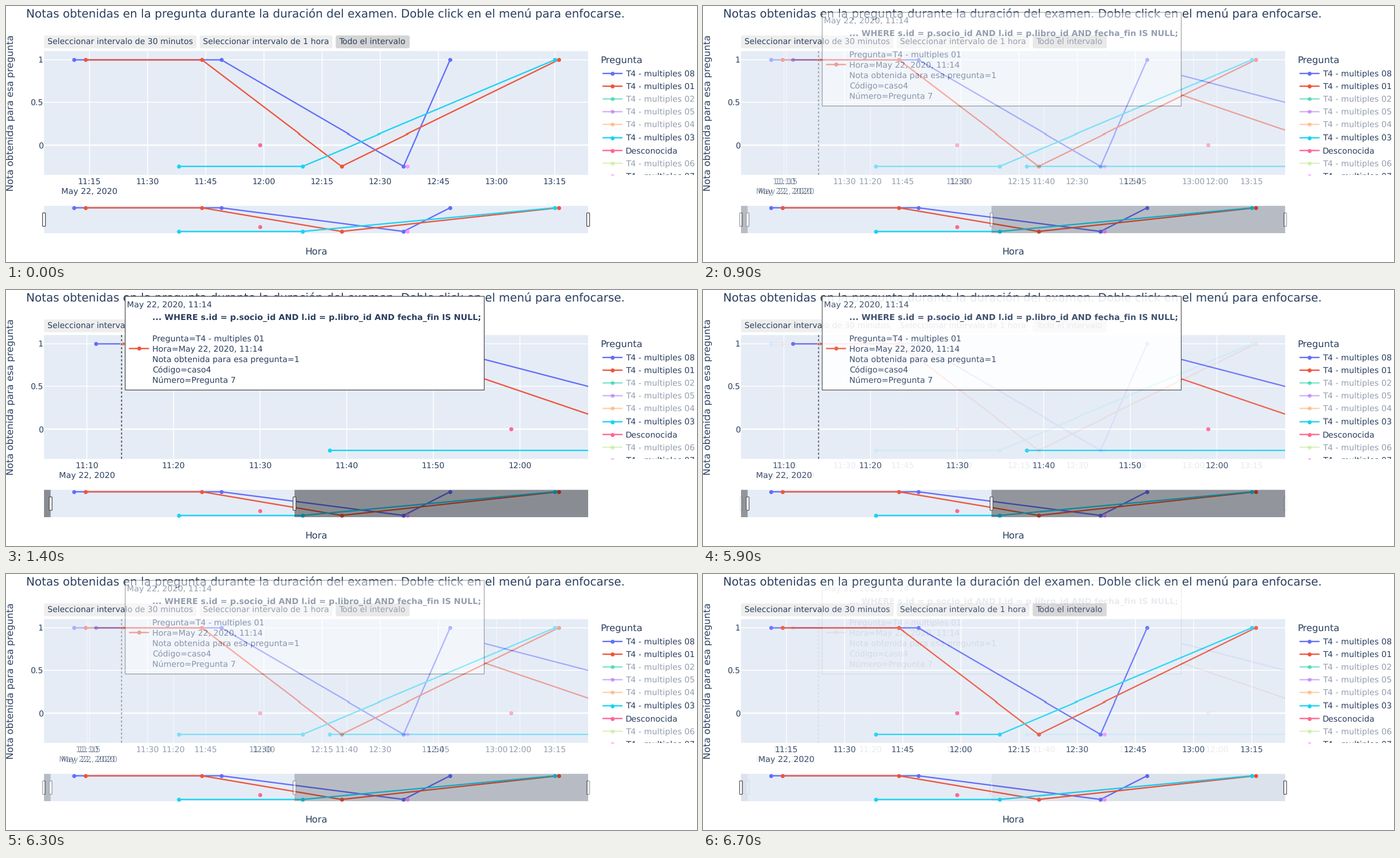
A matplotlib script for the animation above (6.8 s loop, 1200 by 444 pixels).

```python
import numpy as np
import matplotlib.pyplot as plt
from matplotlib.animation import FuncAnimation
from matplotlib.patches import FancyBboxPatch, Rectangle

W, H, DPI = 1200, 444, 100
PX = 72 / DPI  # points per pixel
FRAMES, INTERVAL = 68, 100

plt.rcParams["font.family"] = "DejaVu Sans"
plt.rcParams["text.hinting"] = "none"

INK, BG, EDGE = "#2a3f5f", "#e5ecf6", "#444444"
BLUE, RED, CYAN = "#636efa", "#ef553b", "#19d3f3"
PINK, MAGENTA = "#ff6692", "#ff97ff"

LEFT, RIGHT, TOP, BOTTOM = 66, 1011, 79.2, 293
SLIDE_TOP, SLIDE_BOTTOM = 346.6, 394

# colour, then (minute of day, mark) points
SERIES = [
    (BLUE, [(671, 1), (709, 1), (756, -0.25), (768, 1)]),
    (RED, [(674, 1), (704, 1), (740, -0.25), (796, 1)]),
    (CYAN, [(698, -0.25), (730, -0.25), (795, 1)]),
    (PINK, [(719, 0)]),
    (MAGENTA, [(757, -0.25)]),
]

# label, colour, opacity
LEGEND = [
    ("T4 - multiples 08", BLUE, 1),
    ("T4 - multiples 01", RED, 1),
    ("T4 - multiples 02", "#00cc96", 0.5),
    ("T4 - multiples 05", "#ab63fa", 0.5),
    ("T4 - multiples 04", "#ffa15a", 0.5),
    ("T4 - multiples 03", CYAN, 1),
    ("Desconocida", PINK, 1),
    ("T4 - multiples 06", "#b6e880", 0.5),
    ("T4 - multiples 07", MAGENTA, 1),
]

BUTTONS = [
    (66, 331, "Seleccionar intervalo de 30 minutos", "#eeeeee"),
    (336.5, 567, "Seleccionar intervalo de 1 hora", "#eeeeee"),
    (572.5, 701, "Todo el intervalo", "#d4d4d4"),
]

fig = plt.figure(figsize=(W / DPI, H / DPI), dpi=DPI, facecolor="white")


def full_axes():
    ax = fig.add_axes([0, 0, 1, 1])
    ax.set(xlim=(0, W), ylim=(H, 0))
    ax.axis("off")
    return ax


class Scene:
    def __init__(self):
        self.ax = full_axes()
        self.z = 0

    def next_z(self):
        self.z += 1
        return self.z

    def text(self, x, y, s, size=14, clip=None, **kw):
        kw = {"ha": "left", "color": INK, **kw}
        label = self.ax.text(x, y, s, fontsize=size * PX, va="baseline",
                             rotation_mode="anchor", zorder=self.next_z(), **kw)
        if clip is not None:
            label.set_clip_on(True)
            label.set_clip_path(clip)

    def rect(self, x0, y0, x1, y1, color, edge="none", lw=0, alpha=None):
        box = Rectangle((x0, y0), x1 - x0, y1 - y0, fc=color, ec=edge, snap=False,
                        lw=lw * PX, alpha=alpha, zorder=self.next_z())
        return self.ax.add_patch(box)

    def round_rect(self, x0, y0, x1, y1, r, color, edge="none", lw=0):
        box = FancyBboxPatch((x0, y0), x1 - x0, y1 - y0, snap=False,
                             boxstyle=f"round,pad=0,rounding_size={r}",
                             fc=color, ec=edge, lw=lw * PX, zorder=self.next_z())
        self.ax.add_patch(box)

    def line(self, xs, ys, color, lw, clip=None, **kw):
        kw = {"solid_capstyle": "butt", **kw}
        ln, = self.ax.plot(xs, ys, color=color, lw=lw * PX, snap=False,
                           zorder=self.next_z(), **kw)
        if clip is not None:
            ln.set_clip_path(clip)

    def trace(self, xs, ys, color, clip=None, alpha=None):
        self.line(xs, ys, color, 2.33, clip, alpha=alpha)
        self.line(xs, ys, color, 0, clip, alpha=alpha, ls="none",
                  marker="o", ms=7 * PX, mew=0)

    def key(self, x, y, color, clip=None, alpha=None):
        self.line([x - 17.4, x + 17.4], [y, y], color, 2.33, clip, alpha=alpha)
        self.trace([x], [y], color, clip, alpha)


def wide_x(t):
    return 145 + (t - 675) * 6.7333


def zoom_x(t):
    return 140.5 + (t - 670) * 15.04


def mark_y(v):
    return 241.4 - 147 * v


def slide_y(v):
    return 382.8 - 32.8 * v


def draw_series(sc, to_x, to_y, clip):
    for color, pts in SERIES:
        t, v = np.array(pts, float).T
        sc.trace(to_x(t), to_y(v), color, clip)


def draw_plot(sc, to_x, ticks):
    area = sc.rect(LEFT, TOP, RIGHT, BOTTOM, BG)
    for t in ticks:
        sc.line([to_x(t)] * 2, [TOP, BOTTOM], "white", 1.5)
        sc.text(to_x(t), 308.3, f"{t // 60}:{t % 60:02d}", ha="center")
    for v in (0.5, 1, 0):
        y = mark_y(v)
        sc.line([LEFT, RIGHT], [y, y], "white", 1.5 if v else 2.4)
        sc.text(64.5, y + 5, f"{v:g}", ha="right")
    sc.text(to_x(ticks[0]), 326.5, "May 22, 2020", 14.2, ha="center")
    draw_series(sc, to_x, mark_y, area)


def draw_slider(sc, x0, x1):
    area = sc.rect(LEFT, SLIDE_TOP, RIGHT, SLIDE_BOTTOM, BG)
    draw_series(sc, wide_x, slide_y, area)
    for a, b in ((LEFT, x0), (x1, RIGHT)):
        if b > a:
            sc.rect(a, SLIDE_TOP, b, SLIDE_BOTTOM, "black", alpha=0.4)
    for x in (x0, x1):
        sc.round_rect(x - 2.5, 358.8, x + 2.5, 382.2, 1.1, "white", EDGE, 1.2)


def draw_legend(sc):
    sc.text(1032, 100.8, "Pregunta", 16.3)
    clip = Rectangle((1015, 80), 185, BOTTOM - 80, transform=sc.ax.transData)
    for i, (label, color, alpha) in enumerate(LEGEND):
        y = 118 + 22.1 * i
        sc.key(1053.3, y, color, clip, alpha)
        sc.text(1076, y + 5, label, 14.3, clip, alpha=alpha)


def draw_frame(sc):
    sc.text(35, 21, "Notas obtenidas en la pregunta durante la duración del examen. "
            "Doble click en el menú para enfocarse.", 19.85)
    for x0, x1, label, color in BUTTONS:
        sc.round_rect(x0, 52, x1, 74.3, 3.5, color)
        sc.text(x0 + 5.7, 67.2, label)
    sc.text(13, 186, "Nota obtenida para esa pregunta", 16.28,
            ha="center", rotation=90)
    sc.text(538.5, 430.3, "Hora", 16.3, ha="center")
    draw_legend(sc)


def draw_hover(sc):
    x = zoom_x(674)
    sc.line([x, x], [TOP, BOTTOM], BG, 4)
    sc.line([x, x], [TOP, BOTTOM], EDGE, 1.75, ls=(0, (2, 2)),
            dash_capstyle="butt")
    sc.rect(207, 12, 830.5, 174.5, "white", EDGE, 1.2)
    sc.text(209.5, 31, "May 22, 2020, 11:14", 14.3)
    sc.text(254, 53, "... WHERE s.id = p.socio_id AND l.id = p.libro_id "
            "AND fecha_fin IS NULL;", 14.2, weight="bold")
    rows = ["Pregunta=T4 - multiples 01", "Hora=May 22, 2020, 11:14",
            "Nota obtenida para esa pregunta=1", "Código=caso4",
            "Número=Pregunta 7"]
    for i, row in enumerate(rows):
        sc.text(254, 89.6 + 18.2 * i, row, 14.1)
    sc.key(231, 102.5, RED)


def snapshot():
    fig.canvas.draw()
    img = np.array(fig.canvas.buffer_rgba())[..., :3] / 255
    fig.clear()
    return img


def wide_view():
    sc = Scene()
    draw_frame(sc)
    draw_plot(sc, wide_x, range(675, 796, 15))
    draw_slider(sc, LEFT, RIGHT)
    return snapshot()


def zoom_view():
    sc = Scene()
    draw_frame(sc)
    draw_plot(sc, zoom_x, range(670, 721, 10))
    draw_slider(sc, 77.5, 501)
    draw_hover(sc)
    return snapshot()


wide, zoom = wide_view(), zoom_view()
screen = full_axes().imshow(wide, extent=(0, W, H, 0), aspect="auto",
                            interpolation="nearest")


def update(n):
    # fade in over ten steps, hold, fade out over ten steps
    mix = np.clip(min(n - 4, FRAMES - n) / 10, 0, 1)
    screen.set_data(wide + (zoom - wide) * mix)
    return [screen]


anim = FuncAnimation(fig, update, frames=FRAMES, interval=INTERVAL,
                     init_func=lambda: update(0), repeat=True, repeat_delay=0)
plt.show()
```
